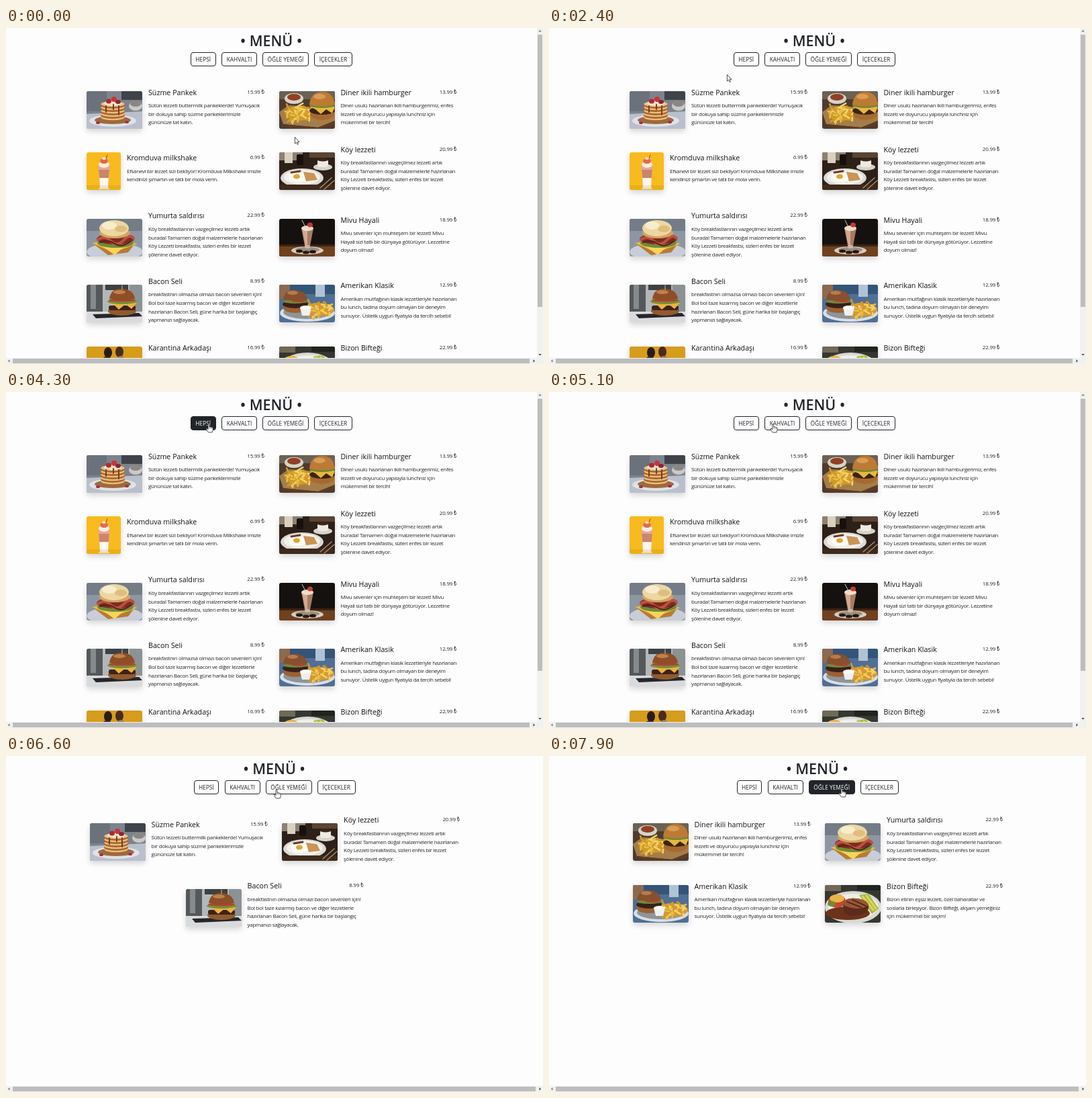
Recreate the animation shown at these times as an HTML page. Size 800 by 500 pixels, loop 8000 ms.

```html
<!DOCTYPE html>
<html lang="tr">
<head>
<meta charset="utf-8">
<style>
html, body { margin: 0; width: 100%; height: 100%; overflow: hidden; background: #fefdfe; }
body { position: relative; color: #212529; font-family: "Open Sans", "Noto Sans", sans-serif; }
body *, .pointer { box-sizing: border-box; }
#page, .view, .card, .card > *, .overlay { position: absolute; }
h1 { position: absolute; left: 295px; top: 3.5px; width: 200px; margin: 0; text-align: center;
  font-size: 21.5px; line-height: 30px; font-weight: 600; white-space: nowrap; }
.button { position: absolute; top: 36px; height: 21px; border: 1px solid #212529; border-radius: 4px;
  font-size: 8.4px; line-height: 19px; text-align: center; white-space: nowrap; }
.button.hover { background: #212529; color: #fff; }
.card { white-space: nowrap; }
.photo { height: 56px; top: -28px; border-radius: 3px; overflow: hidden; box-shadow: 0 4px 8px rgba(0,0,0,.16); }
.photo svg { display: block; }
.title { font-size: 10.7px; line-height: 16px; font-weight: 500; color: #111; }
.price { right: -265px; font-size: 8px; line-height: 12px; letter-spacing: -.2px; }
.text { font-size: 8px; line-height: 12.55px; letter-spacing: -.3px; }
.overlay { left: 0; top: 0; }
</style>
</head>
<body>
<div id="page"><h1>• MENÜ •</h1></div>
<svg class="overlay" id="bars" width="800" height="500"></svg>
<svg class="overlay" width="800" height="500">
  <g id="arrow" fill="#fff" stroke="#222" stroke-width=".8" stroke-linejoin="round">
    <path d="M.4 .4V10.2L2.6 8.1 4.1 11.4 5.6 10.7 4.1 7.6H7Z"/>
  </g>
  <g id="hand" fill="#fff" stroke="#222" stroke-width=".8" stroke-linejoin="round">
    <path d="M-1 1Q0 -.6 1 1V5Q2.2 4 3 5.2 4.2 4.4 4.8 5.6 6 5 6.3 6.5V9.5L5.2 13H-.6L-3.5 8.8Q-4.3 7-2.8 7L-1 8.6Z"/>
    <path d="M1 5V7.5M3 5.2V7.6M4.8 5.6V7.8" fill="none" stroke-width=".5"/>
  </g>
</svg>
<script>
// Small drawing vocabulary for the food pictures (83 x 56 each).
const oval = (x, y, rx, ry, c) => `<ellipse cx="${x}" cy="${y}" rx="${rx}" ry="${ry}" fill="${c}"/>`;
const box = (x, y, w, h, c, r = 0) => `<rect x="${x}" y="${y}" width="${w}" height="${h}" rx="${r}" fill="${c}"/>`;
const shape = (d, c) => `<path d="${d}" fill="${c}"/>`;
const line = (d, c, w) => `<path d="${d}" fill="none" stroke="${c}" stroke-width="${w}" stroke-linecap="round"/>`;
const random = n => { const v = Math.sin(n * 127.1) * 43758.5; return v - Math.floor(v); };
const fries = (x, y, w, h, count) => Array.from({ length: count }, (_, i) => {
  const fx = x + random(i + 1) * w, fy = y + random(i + 50) * h;
  const dx = random(i + 90) * 18 - 9, dy = random(i + 130) * 12 - 6;
  return line(`M${fx} ${fy}l${dx} ${dy}`, ['#e9bd43', '#d39a25', '#f3d36a'][i % 3], 2.6);
}).join('');
const backdrop = c => box(0, 0, 83, 56, c);

const pictures = {
  pancake: backdrop('#7d838c') + box(0, 0, 30, 30, '#6b727c') + box(52, 0, 31, 13, '#3f434a') +
    shape('M0 34L83 30V56H0Z', '#b9c0cb') + oval(73, 22, 10, 7, '#c9c9c8') + oval(73, 19, 8, 4, '#8c8580') +
    oval(39, 44, 35, 9, '#dfe2e8') + oval(39, 43, 27, 6, '#9a6b43') +
    [41, 36, 31, 26, 21].map(y => oval(39, y, 18, 5, '#a9662c') + oval(39, y - 1.8, 17.5, 4, '#e8bf83')).join('') +
    oval(39, 18, 13, 4, '#f2e3cc') + oval(33, 15, 4, 3.5, '#b3282c') + oval(41, 12, 4, 4, '#c8343a') +
    oval(47, 16, 4, 3, '#8d2430') + line('M29 22V31M48 22V35M40 20V27', '#7e3b1c', 2) +
    oval(17, 47, 3, 2, '#a5313b') + oval(60, 46, 3, 2, '#a5313b'),
  diner: backdrop('#4e3b2d') + box(0, 0, 83, 12, '#6b6255') + oval(22, 11, 14, 8, '#d6d4c6') +
    oval(22, 9, 10, 5, '#923f24') + shape('M0 31L14 21 83 26V44L58 54 6 49Z', '#a57d49') +
    shape('M6 49L58 54 83 44V50L60 56H18Z', '#5b3d24') + oval(29, 33, 20, 11, '#cf9a2b') + fries(12, 22, 34, 22, 48) +
    oval(64, 34, 18, 9, '#a8692f') + oval(64, 29, 19, 6, '#3c2415') + shape('M45 23L83 23 79 33 70 27 62 34 54 27Z', '#e8b83b') +
    oval(64, 21, 19, 4, '#6f8a35') + shape('M45 20Q47 1 64 1T83 20Q64 25 45 20Z', '#bd7a35') + oval(60, 8, 9, 4, '#d99d56'),
  shake: box(0, 0, 51, 56, '#f8bb1d') + box(0, 49, 51, 7, '#eab018') + shape('M18 24H34L32 54H20Z', '#f1e3d8') +
    shape('M18 25H34L33 38H19Z', '#c9856f') + box(17, 21, 18, 5, '#e9a697', 2) + oval(26, 18, 8, 5, '#fbeee6') +
    oval(26, 13, 6, 4, '#e5694e') + oval(26, 9, 3, 2, '#f7ded1') + line('M29 9L31 4', '#d43f36', 1.2) +
    box(20, 39, 12, 10, '#fff7f0', 2) + box(18, 53, 16, 2, '#e9d7b0', 1),
  village: backdrop('#2d2018') + box(0, 0, 35, 12, '#8d8172') + box(8, 0, 12, 16, '#d9d0c0') + box(26, 3, 10, 16, '#17110e', 2) +
    box(45, 0, 38, 8, '#5a4433') + oval(65, 22, 14, 5, '#d7d2ca') + box(57, 10, 16, 12, '#eeeae2', 4) + oval(65, 11, 8, 2.5, '#3d2518') +
    oval(34, 38, 32, 14, '#dcd9d4') + oval(34, 37, 27, 11, '#f3f0eb') + oval(27, 37, 13, 7, '#fffdf5') + oval(26, 36, 5, 3.5, '#e4a132') +
    shape('M36 29L52 31 57 41 40 43Z', '#c99455') + line('M18 30L31 28', '#6b3c21', 3) + box(0, 48, 83, 8, '#3e2a1c') +
    line('M61 53L78 38M67 55L82 42', '#ab8a69', 1.5),
  egg: backdrop('#8d96a3') + box(0, 0, 83, 18, '#737c87') + oval(42, 49, 42, 13, '#c8cdd7') +
    shape('M10 37L30 29 72 37 62 50 32 54Z', '#b77b34') + shape('M8 36L46 30 76 37 40 50Z', '#f0bd36') +
    shape('M24 41L42 54 54 43Z', '#f6d45b') + oval(43, 36, 27, 7, '#6f8b37') + oval(43, 30, 28, 8, '#7b2c21') +
    line('M17 31Q27 24 36 33T55 32 70 29', '#bd5040', 4) + line('M20 35Q32 30 42 37T65 34', '#56201a', 2) +
    oval(42, 21, 23, 8, '#d4a45f') + oval(41, 14, 22, 12, '#ecd6a4') + oval(34, 10, 11, 6, '#f8ecca') + oval(51, 15, 9, 5, '#e0bd7b'),
  dream: backdrop('#15110f') + box(0, 39, 83, 17, '#70411f') + box(0, 38, 83, 3, '#3b2213') +
    oval(42, 47, 24, 6, '#d4cdc3') + oval(42, 46, 18, 4, '#9c8d7e') + shape('M33 14H51L46 40H38Z', '#a77b62') +
    shape('M34 14H42V40H39Z', '#d0aa92') + box(38, 39, 8, 5, '#c7b7aa', 2) + oval(42, 14, 9, 4, '#f0ddcb') +
    oval(46, 9, 4, 3.5, '#c33a34') + line('M39 12L34 2', '#d7c7b7', 1) + oval(30, 48, 5, 2.5, '#241813') +
    oval(40, 50, 5, 2.5, '#2b1c14') + oval(50, 49, 5, 2.5, '#211510'),
  bacon: backdrop('#b3b7b9') + box(0, 0, 24, 40, '#53585b') + box(6, 0, 8, 36, '#858b8c') + box(64, 0, 19, 42, '#8b9294') +
    box(28, 0, 34, 8, '#3d4142') + box(0, 40, 83, 16, '#d9dadb') + shape('M9 44L78 42 83 47 14 50Z', '#24262a') +
    oval(53, 39, 21, 7, '#925a2d') + box(33, 31, 40, 7, '#3e2219', 3) + shape('M31 27H75L67 36 58 29 48 37 40 29Z', '#edb33b') +
    oval(53, 25, 22, 4, '#73913a') + oval(53, 23, 20, 2.5, '#b34230') + shape('M34 21Q36 5 53 6T72 21Q53 25 34 21Z', '#8d4e28') +
    oval(49, 11, 9, 3, '#c28146') + line('M53 7V1', '#d4c29d', 1),
  classic: backdrop('#506f94') + box(0, 0, 83, 14, '#345578') + box(0, 0, 16, 21, '#8c6a50') + box(54, 0, 14, 18, '#b0c3d4') +
    oval(42, 42, 41, 13, '#d7dfe7') + oval(42, 41, 36, 10, '#8f9499') + oval(59, 37, 23, 10, '#d7973c') + fries(44, 25, 32, 22, 38) +
    oval(24, 35, 18, 7, '#9c6032') + oval(24, 29, 19, 6, '#39211a') + oval(24, 25, 18, 3, '#728a38') + oval(29, 24, 11, 2, '#b44231') +
    shape('M6 22Q8 7 24 8T42 22Q24 26 6 22Z', '#87502f') + oval(20, 12, 8, 3, '#b97b49') +
    shape('M31 34H48L45 46H34Z', '#eef0f0') + oval(39.5, 34, 8.5, 3, '#fbfbf7'),
  couple: backdrop('#d69d1c') + oval(32, 9, 6, 8, '#2b1b16') + oval(49, 8, 6, 8, '#4b2b1b') +
    shape('M15 56Q17 12 32 15T41 56Z', '#333032') + shape('M41 56Q38 16 50 14T69 56Z', '#8d8176'),
  bison: backdrop('#363730') + box(0, 0, 24, 9, '#6f6956') + box(48, 0, 35, 8, '#20241f') + oval(42, 33, 42, 24, '#d9d9d3') +
    oval(42, 32, 37, 19, '#f0eee7') + oval(34, 42, 33, 10, '#6d321c') + oval(18, 24, 13, 10, '#c7492d') + oval(18, 20, 11, 6, '#e8b449') +
    oval(10, 28, 6, 4, '#6c8f37') + shape('M51 15L65 13 80 35 70 43Z', '#a9b83b') + line('M56 17L72 37M62 16L76 35', '#dcd65a', 3) +
    shape('M27 27Q31 18 47 20T65 30Q67 42 50 45T28 40Z', '#5d2b1d') + shape('M27 27Q31 18 47 20T65 30Q54 37 40 34T27 27Z', '#9a5535') +
    line('M33 25L54 33M41 22L61 31', '#43201a', 1.7)
};

const villageText = ['Köy breakfastlarının vazgeçilmez lezzeti artık', 'burada! Tamamen doğal malzemelerle hazırlanan',
  'Köy Lezzeti breakfastsı, sizleri enfes bir lezzet', 'şölenine davet ediyor.'];
const dishes = {
  pancake: ['Süzme Pankek', '15.99', ['Sütün lezzeti buttermilk pankeklerde! Yumuşacık', 'bir dokuya sahip süzme pankeklerimizle', 'gününüze tat katın.']],
  diner: ['Diner ikili hamburger', '13.99', ['Diner usulü hazırlanan ikili hamburgerimiz, enfes', 'lezzeti ve doyurucu yapısıyla lunchniz için', 'mükemmel bir tercih!']],
  shake: ['Kromduva milkshake', '6.99', ['Efsanevi bir lezzet sizi bekliyor! Kromduva Milkshake imizle', 'kendinizi şımartın ve tatlı bir mola verin.']],
  village: ['Köy lezzeti', '20.99', villageText],
  egg: ['Yumurta saldırısı', '22.99', villageText],
  dream: ['Mivu Hayali', '18.99', ['Mivu sevenler için muhteşem bir lezzet! Mivu', 'Hayali sizi tatlı bir dünyaya götürüyor. Lezzetine', 'doyum olmaz!']],
  bacon: ['Bacon Seli', '8.99', ['breakfastnın olmazsa olmazı bacon sevenleri için!', 'Bol bol taze kızarmış bacon ve diğer lezzetlerle', 'hazırlanan Bacon Seli, güne harika bir başlangıç', 'yapmanızı sağlayacak.']],
  classic: ['Amerikan Klasik', '12.99', ['Amerikan mutfağının klasik lezzetleriyle hazırlanan', 'bu lunch, tadına doyum olmayan bir deneyim', 'sunuyor. Üstelik uygun fiyatıyla da tercih sebebi!']],
  couple: ['Karantina Arkadaşı', '16.99', ['', '', '']],
  bison: ['Bizon Bifteği', '22.99', ['Bizon etinin eşsiz lezzeti, özel baharatlar ve', 'soslarla birleşiyor. Bizon Bifteği, akşam yemeğiniz', 'için mükemmel bir seçim!']]
};

const LEFT = 120, RIGHT = 406.5, MIDDLE = 263;
function card(key, x, centerY) {
  const [title, price, lines] = dishes[key];
  const width = key === 'shake' ? 51 : 83;
  const titleY = -26.5 + (3 - lines.length) * 6.25;
  return `<div class="card" style="left:${x}px;top:${centerY}px">
    <div class="photo" style="width:${width}px"><svg width="${width}" height="56">${pictures[key]}</svg></div>
    <div class="title" style="left:${width + 9}px;top:${titleY - 8}px">${title}</div>
    <div class="price" style="top:${titleY - 7}px">${price} ₺</div>
    <div class="text" style="left:${width + 9}px;top:${titleY + 13.7}px">${lines.join('<br>')}</div></div>`;
}

const page = document.getElementById('page');
const addView = cards => {
  const view = document.createElement('div');
  view.className = 'view';
  view.innerHTML = cards.map(c => card(...c)).join('');
  return page.appendChild(view);
};
const views = [
  addView([['pancake', LEFT, 122], ['diner', RIGHT, 122], ['shake', LEFT, 213.3], ['village', RIGHT, 213.3],
    ['egg', LEFT, 312], ['dream', RIGHT, 312], ['bacon', LEFT, 409.5], ['classic', RIGHT, 409.5],
    ['couple', LEFT, 502], ['bison', RIGHT, 502]]),
  addView([['pancake', LEFT, 128], ['village', RIGHT, 128], ['bacon', MIDDLE, 226]]),
  addView([['diner', LEFT, 128], ['egg', RIGHT, 128], ['classic', LEFT, 220], ['bison', RIGHT, 220]])
];

const buttons = [['HEPSİ', 275, 37.5], ['KAHVALTI', 321, 53], ['ÖĞLE YEMEĞİ', 382, 69], ['İÇECEKLER', 459, 57]]
  .map(([label, x, width]) => {
    const el = document.createElement('div');
    el.className = 'button';
    el.textContent = label;
    el.style.left = x + 'px';
    el.style.width = width + 'px';
    page.appendChild(el);
    return { el, x, width };
  });

function scrollbars(vertical) {
  const end = vertical ? 791 : 800;
  const bars = box(0, 491, 800, 9, '#f1f1f1') + box(10, 492, end - 21, 7, '#bdbdbd') +
    shape('M5.5 493.2V497.8L3 495.5Z', '#777') + shape(`M${end - 5.5} 493.2V497.8L${end - 3} 495.5Z`, '#444');
  return vertical ? bars + box(791, 0, 9, 491, '#f1f1f1') + box(792, 10, 7, 405, '#bdbdbd') +
    shape('M793.2 5.5H797.8L795.5 3Z', '#777') + shape('M793.2 485H797.8L795.5 487.5Z', '#444') : bars;
}

// Pointer stops: time, x, y.
const stops = [[0, 430, 162], [500, 424, 158], [1200, 196, 100], [1700, 165, 112], [2200, 235, 90], [2600, 295, 48],
  [3100, 444, 50], [3200, 457, 50], [3500, 489, 48], [3700, 475, 48], [4200, 303, 47], [4300, 302, 47], [4800, 300, 48],
  [5200, 340, 47], [5800, 340, 46], [6200, 343, 47], [6800, 424, 51], [7000, 430, 54], [7200, 432, 55], [7900, 436, 48]];
function pointerAt(t) {
  const i = Math.max(1, stops.findIndex(s => s[0] >= t));
  const [t0, x0, y0] = stops[i - 1], [t1, x1, y1] = stops[i];
  const u = Math.max(0, (t - t0) / (t1 - t0)), k = u * u * (3 - 2 * u);
  return [x0 + (x1 - x0) * k, y0 + (y1 - y0) * k];
}
const arrow = document.getElementById('arrow'), hand = document.getElementById('hand'), bars = document.getElementById('bars');
let shownView = -1;

function render(now) {
  const t = Math.floor(now % 8000 / 100) * 100;
  const current = t < 5400 ? 0 : t < 7000 ? 1 : 2;
  const shift = current ? 4.6 : 0;
  if (current !== shownView) {
    views.forEach((v, i) => v.style.display = i === current ? '' : 'none');
    page.style.left = shift + 'px';
    bars.innerHTML = scrollbars(current === 0);
    shownView = current;
  }
  const buttonUnder = ([x, y]) => buttons.findIndex(b => y >= 36 && y <= 57 && x >= b.x + shift && x <= b.x + b.width + shift);
  const position = pointerAt(t);
  const hovered = buttonUnder(pointerAt(Math.max(0, t - 100))); // highlight trails the pointer by one step
  buttons.forEach((b, i) => b.el.classList.toggle('hover', i === hovered));
  const overButton = buttonUnder(position) >= 0;
  arrow.style.display = overButton ? 'none' : '';
  hand.style.display = overButton ? '' : 'none';
  (overButton ? hand : arrow).setAttribute('transform', `translate(${position})`);
}
const start = performance.now();
function tick() {
  render(performance.now() - start);
  requestAnimationFrame(tick);
}
tick();
</script>
</body>
</html>
```
